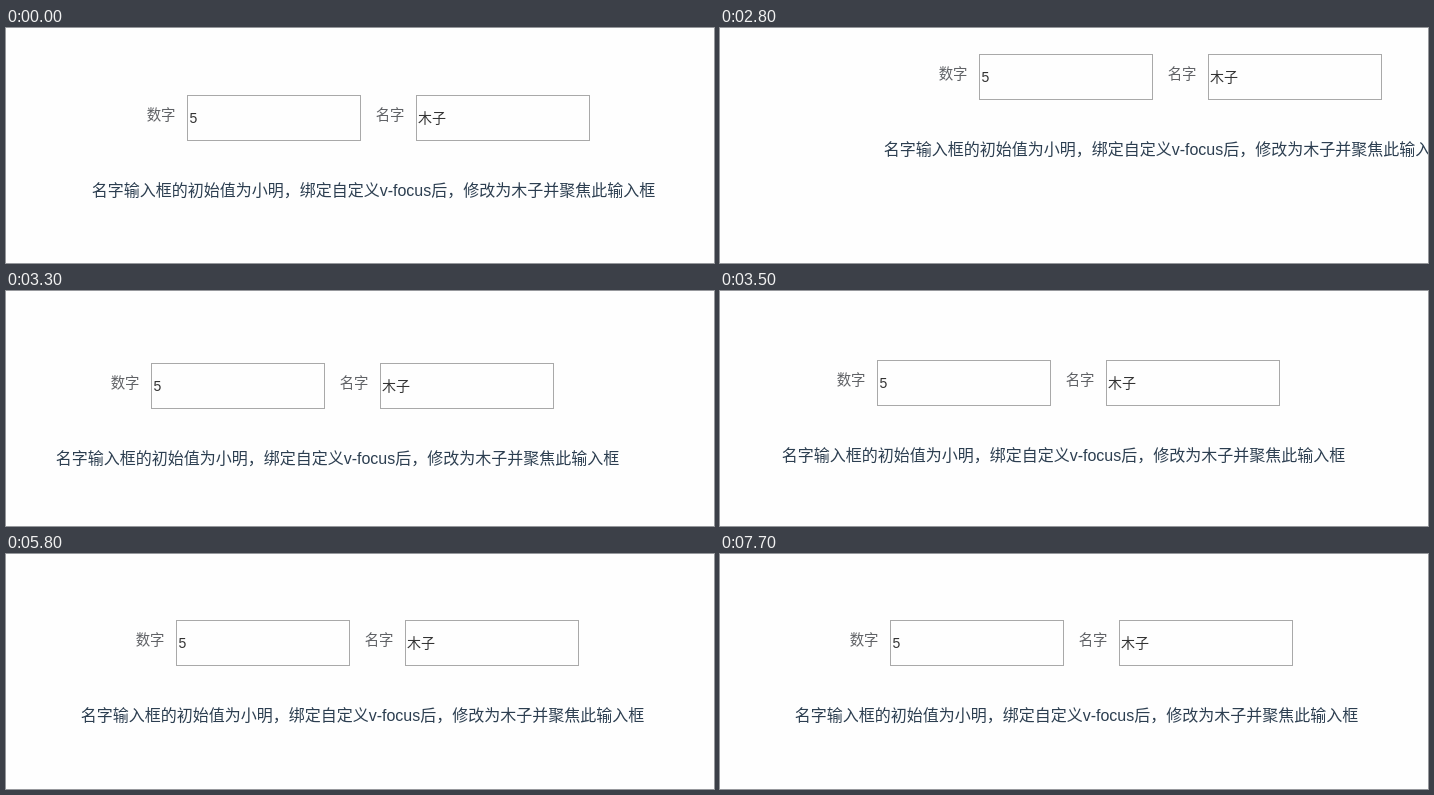
These frames come from a looping animation (708x235 px, 8000 ms). An HTML page:

```html
<!DOCTYPE html>
<html lang="zh-CN">
<head>
<meta charset="utf-8">
<title>v-focus</title>
<style>
  html, body { margin: 0; width: 100%; height: 100%; overflow: hidden; background: #fefefe; }
  svg { display: block; }
  text { font: 300 14px "Liberation Sans", "Noto Sans CJK SC", "Noto Sans CJK", sans-serif; fill: #333; }
  .label { font-size: 14.4px; fill: #606266; }
  .note { font-size: 16px; fill: #2c3e50; }
  .field { fill: none; stroke: #a9a9a9; }
</style>
</head>
<body>
<svg width="708" height="235" viewBox="0 0 708 235">
  <g id="page">
    <text class="label" x="140.7" y="92">数字</text>
    <rect class="field" x="181.5" y="67.5" width="173" height="45"/>
    <text x="183.4" y="95">5</text>
    <text class="label" x="369.7" y="92">名字</text>
    <rect class="field" x="410.5" y="67.5" width="173" height="45"/>
    <text x="412" y="95">木子</text>
    <rect id="caret" x="440" y="82" width="1" height="16" fill="#222"/>
    <text class="note" x="85.7" y="168">名字输入框的初始值为小明，绑定自定义v-focus后，修改为木子并聚焦此输入框</text>
  </g>
</svg>
<script>
const LOOP = 8000, TICK = 100, BLINK = 500;
const DRAG = 2800, DROP = 3300, NUDGE = 3500, REST = 3600;
const FOCUS = 4300, RELOAD = 7200;
const page = document.getElementById('page');
const caret = document.getElementById('caret');

const between = (time, from, to) => time >= from && time < to;
const mix = (a, b, p) => a + (b - a) * p;
const show = (node, on) => node.setAttribute('display', on ? 'inline' : 'none');

// The page is dragged along an upward arc, one hard step per tick.
function offset(time) {
  if (time < DRAG) return [0, 0];
  if (time >= REST) return [-11, -1];
  if (time >= NUDGE) return [-24, 2];
  const tick = Math.floor((time - DRAG) / TICK) * TICK;
  const p = Math.min(1, tick / (DROP - DRAG));
  return [mix(78, -36, p), mix(-41, 5, p) - 38 * Math.sin(Math.PI * p)].map(Math.round);
}

// Blinking restarts when the reloaded page focuses its field.
function caretOn(time) {
  const since = time - (time < RELOAD ? FOCUS : RELOAD);
  return since >= 0 && since % (2 * BLINK) < BLINK;
}

function draw() {
  const time = performance.now() % LOOP;
  page.setAttribute('transform', `translate(${offset(time)})`);
  show(page, !between(time, 500, 700) && !between(time, 6400, RELOAD));
  show(caret, caretOn(time));
  requestAnimationFrame(draw);
}
draw();
</script>
</body>
</html>
```
